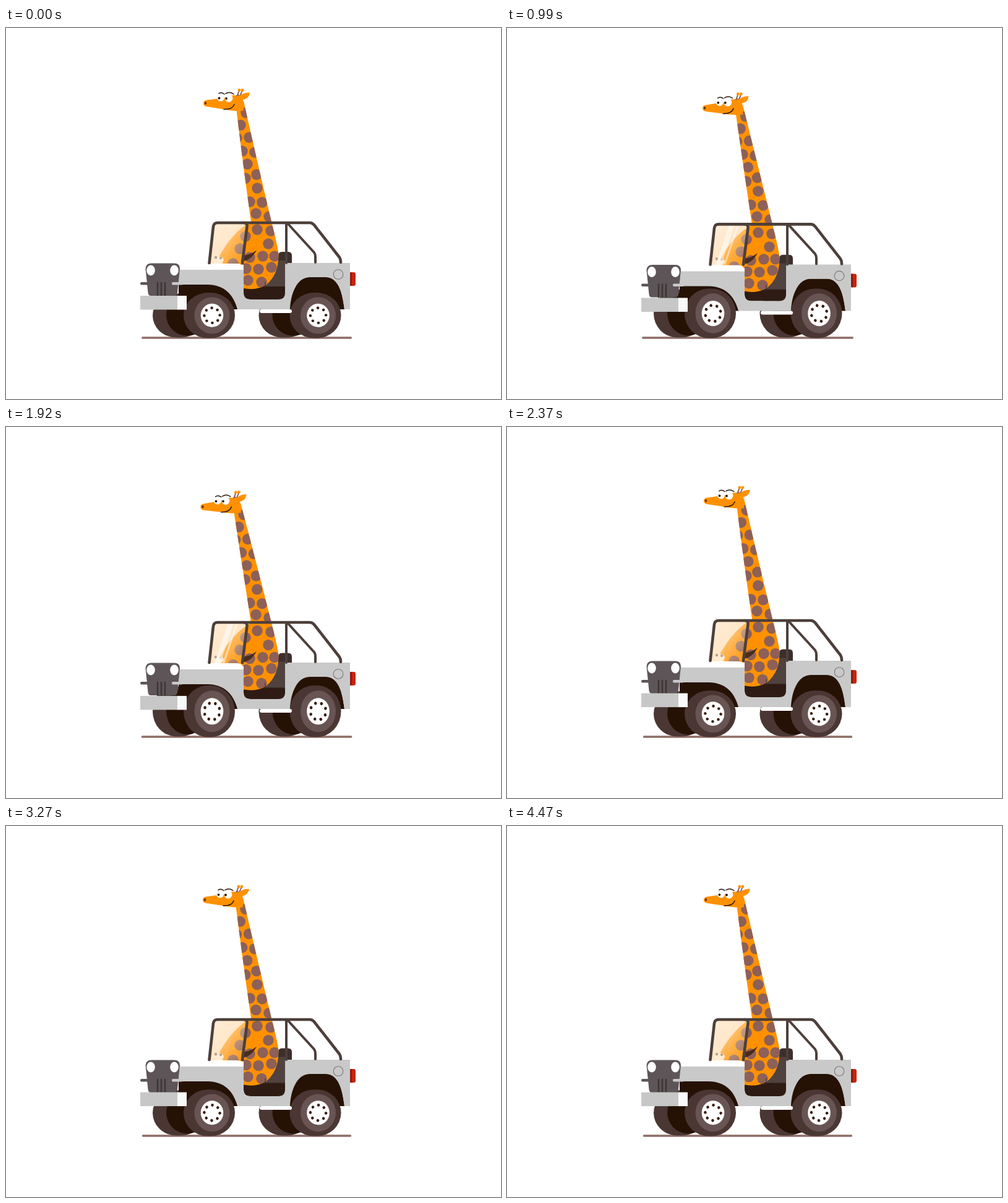
An HTML page for the animation above (4500 ms loop, 800 by 600 pixels).

```html
<!DOCTYPE html>
<html lang="en">
<head>
<meta charset="utf-8">
<title>Giraffe in a car</title>
<style>
  html, body { margin: 0; width: 100%; height: 100%; overflow: hidden; background: #fff; }
  svg { display: block; width: 100vw; height: 100vh; }
  .line { fill: none; stroke-linecap: round; stroke-linejoin: round; }
</style>
</head>
<body>
<svg viewBox="0 0 800 600">
  <defs>
    <clipPath id="hide"><path class="skin"/></clipPath>
    <clipPath id="pane"><path d="M329 381L336 316H389L382 381Z"/></clipPath>
    <linearGradient id="shine" x1="0" y1="0" x2="1" y2="1">
      <stop offset="0" stop-color="#fff1df" stop-opacity=".75"/>
      <stop offset=".5" stop-color="#ffe3bd" stop-opacity=".5"/>
      <stop offset="1" stop-color="#ffd9a8" stop-opacity=".08"/>
    </linearGradient>
    <g id="far">
      <rect x="-96" y="-78" width="84" height="77" rx="38" ry="38.500" fill="#4a3734"/>
      <ellipse cx="-40" cy="-40" rx="34" ry="36" fill="#261204"/>
    </g>
    <g id="near">
      <rect x="-46" y="-79.400" width="83" height="79.400" rx="39" ry="39.700" fill="#4a3734"/>
      <ellipse cy="-39.700" rx="28.500" ry="32" fill="#685553"/>
      <ellipse cy="-39.700" rx="18.300" ry="20.500" fill="#fff"/>
    </g>
  </defs>

  <path id="ground" class="line" stroke="#8d6e66" stroke-width="3.400"/>

  <g class="wheel" data-x="333"><use href="#far"/></g>
  <g class="wheel" data-x="504.5"><use href="#far"/></g>

  <g class="car" fill="#261204">
    <path d="M279 413H325C352 413 370 430 375 455H279Z"/>
    <path d="M453 455C456 425 472 403 490 403H518C539 403 544 432 547 455Z"/>
    <path d="M329 381L336 316H389L382 381Z" fill="#ffead2"/>
    <path d="M384 410H451V428Q451 439 440 439H395Q384 439 384 428Z" fill="#2e1c14"/>
  </g>

  <g id="giraffe">
    <path d="M440 368Q440 362 446 362H456Q462 362 462 368V384H440Z" fill="#3c2f2b"/>
    <path d="M428 376H451V418H418Z" fill="#4f423f"/>
    <path class="skin" fill="#ff9100"/>
    <g id="spots" clip-path="url(#hide)" fill="#8d6058"></g>
    <path d="M405 359Q397 375 383 377V368Q396 367 405 359Z" fill="#4a2c1d"/>
    <path class="line" d="M419 411Q420 415 418 420" stroke="#4a2c1d" stroke-width="1"/>
    <g id="head">
      <g class="line" stroke="#8d6058" stroke-width="2"><path d="M373 111L377 101M378 110L382 101"/></g>
      <circle cx="377" cy="100.500" r="2.400" fill="#ff9100"/>
      <circle cx="382" cy="100.500" r="2.400" fill="#ff9100"/>
      <path d="M319 122Q319 117 325 116.500L352 113Q363 108 374 109L379 109Q384 104 394 104.500Q393 114 383 116L384 134H372Q364 134 352 131.500L324 127Q319 126 319 122Z" fill="#ff9100"/>
      <path d="M371 110L375 107L378 109Z" fill="#8d6058"/>
      <circle cx="347" cy="113" r="5.800" fill="#fff"/>
      <circle cx="360" cy="113.500" r="6.400" fill="#fff"/>
      <g fill="#20130d">
        <circle cx="344.500" cy="113.500" r="1.900"/>
        <circle cx="356" cy="114" r="1.900"/>
        <ellipse cx="322.500" cy="121.500" rx="1.700" ry="2.200" fill="#6b2d14"/>
      </g>
      <path class="line" d="M344 106Q348 103 353 107M355 106Q362 102 368 107M352 131.500Q366 132 369 123.500" stroke="#2a1710" stroke-width="1.500"/>
    </g>
  </g>

  <g class="car">
    <g clip-path="url(#pane)">
      <ellipse cx="343" cy="375" rx="9" ry="6" fill="#fff3e2"/>
      <circle cx="339" cy="371" r="2.300" fill="#7b625a"/>
      <circle cx="347" cy="372" r="2" fill="#7b625a"/>
      <path d="M329 381L336 316H389L382 381Z" fill="url(#shine)"/>
      <path id="glare" d="M359 316H368L346 381H337ZM372 316H375L353 381H350Z" fill="#fff"/>
    </g>
    <path d="M326 381H373Q384 381 384 392V400H326Z" fill="#fff"/>
    <path d="M270 391H384V428Q384 439 395 439H440Q451 439 451 428V380H556V455H547C544 432 539 403 516 403H491C470 403 460 430 459 455H374C368 431 352 415 326 415H279L268 415V411H270Z" fill="#c9c9c9"/>
    <circle cx="537" cy="398.500" r="7.800" fill="none" stroke="#7d7876" stroke-width="1.100"/>
    <rect x="556" y="395" width="9" height="22" rx="3" fill="#c8240c"/>
    <rect x="556" y="395" width="3" height="22" fill="#8f1a10"/>
    <rect x="217" y="411" width="14" height="4.500" rx="2.200" fill="#5d5557"/>
    <path d="M235 380.500H272Q281 380.500 281 389L277 428Q276.500 433 272 433H234Q230 433 229.500 428L225.500 389Q226 380.500 235 380.500Z" fill="#5d5557"/>
    <path class="line" d="M245 412V433M251 412V433M257 412V433" stroke="#3d3434" stroke-width="2.400"/>
    <ellipse cx="234" cy="392" rx="6.800" ry="8.500" fill="#fff"/>
    <ellipse cx="272" cy="392" rx="6.800" ry="8.500" fill="#fff"/>
    <rect x="268" y="411" width="18" height="4.500" rx="2" fill="#c9c9c9"/>
    <g class="line" stroke="#4d3f3a" stroke-width="4.600">
      <path d="M328.500 380L335 321Q336 315 342 315H491Q495 315 498 318.500L539 371Q541 374 541 379"/>
      <path d="M384 315Q390 315 389.500 321L382 380"/>
      <path d="M453 315V380M456 317L498 363Q500 366 500 370V379" stroke-width="4"/>
    </g>
  </g>

  <g class="wheel" data-x="333"><use href="#near"/><g class="bolts" fill="#3a1c10"></g></g>
  <g class="wheel" data-x="504.5"><use href="#near"/><g class="bolts" fill="#3a1c10"></g></g>

  <g class="car"><rect x="410" y="455" width="52" height="6" rx="3" fill="#fff"/></g>
  <g id="bumper">
    <rect x="217" y="433" width="61" height="22.500" fill="#c6c7c6"/>
    <rect x="277" y="433" width="15" height="22.500" fill="#f9f9f9"/>
  </g>
</svg>
<script>
const LOOP = 4500, STEP = 30, BOUNCE = 300;
const NS = "http://www.w3.org/2000/svg";
const all = q => [...document.querySelectorAll(q)];
const byId = id => document.getElementById(id);

const dot = (parent, x, y, r) => {
  const c = document.createElementNS(NS, "circle");
  c.setAttribute("cx", x);
  c.setAttribute("cy", y);
  c.setAttribute("r", r);
  parent.append(c);
  return c;
};

const bolts = all(".bolts");
for (const g of bolts)
  for (let i = 0; i < 8; i++) {
    const a = i * Math.PI / 4;
    dot(g, 12.6 * Math.cos(a), 12.6 * Math.sin(a), 2.3);
  }

const places = [
  [388, 137], [379, 157], [393, 177], [373, 178], [382, 199], [402, 201],
  [390, 220], [387, 243], [405, 237], [406, 259], [394, 281], [414, 282],
  [404, 300], [425, 305], [406, 326], [428, 328], [387, 337],
  [424, 349], [378, 357], [415, 369], [434, 369], [394, 371], [367, 381],
  [388, 389], [408, 390], [429, 387], [391, 408], [413, 411]
];
const spots = places.map(([x, y]) => ({ x, y, el: dot(byId("spots"), x, y, 8.7) }));

const cars = all(".car"), wheels = all(".wheel"), skins = all(".skin");
const move = (el, x, y) => el.setAttribute("transform", `translate(${x} ${y})`);

function draw(time) {
  const a = 2 * Math.PI * time / BOUNCE;
  const wave = (mid, cos, sin) => mid + cos * Math.cos(a) + sin * Math.sin(a);

  const lift = wave(-.5, .5, 3.2);
  cars.forEach(g => move(g, 0, lift));
  move(byId("bumper"), 0, wave(-.25, .25, 4));

  const half = 168.3 + lift * .4;
  byId("ground").setAttribute("d", `M${389 - half} 501H${389 + half}`);

  const stretch = wave(39.7, -3, -.7) / 39.7;
  wheels.forEach(g => g.setAttribute("transform",
    `translate(${g.dataset.x} 501.5) scale(1 ${stretch})`));
  const turn = -2 - time * 45 / BOUNCE;
  bolts.forEach(g => g.setAttribute("transform",
    `translate(0 -39.7) scale(1 1.04) rotate(${turn})`));

  // The neck sways more towards the head.
  const dx = wave(-2.75, 2.75, .8), dy = wave(.75, -.75, .4);
  const bend = (x, y) => {
    const k = Math.max(0, (313 - y) / 190) ** 2;
    return [x + dx * k, y + dy * k];
  };
  const p = (x, y) => bend(x, y).join(" ");
  const skin = `M${p(371.5, 124)}Q${p(382, 215)} ${p(396, 313)}Q366 330 344 370L352 383H384V421`
    + `Q406 425 421 415Q443 396 440 361Q436 340 429 313Q${p(405, 212)} ${p(384, 118)}Z`;
  skins.forEach(s => s.setAttribute("d", skin));
  for (const { x, y, el } of spots) {
    const [cx, cy] = bend(x, y);
    el.setAttribute("cx", cx);
    el.setAttribute("cy", cy);
  }
  const nod = wave(-1.4, 1.4, 0);
  byId("head").setAttribute("transform", `translate(${dx} ${dy}) rotate(${nod} 378 126)`);
  move(byId("giraffe"), 0, wave(.5, -.5, 4.4));
  byId("glare").setAttribute("opacity", wave(.3, -.25, .1));
}

function tick() {
  draw(Math.floor(performance.now() % LOOP / STEP) * STEP);
  requestAnimationFrame(tick);
}
tick();
</script>
</body>
</html>
```
